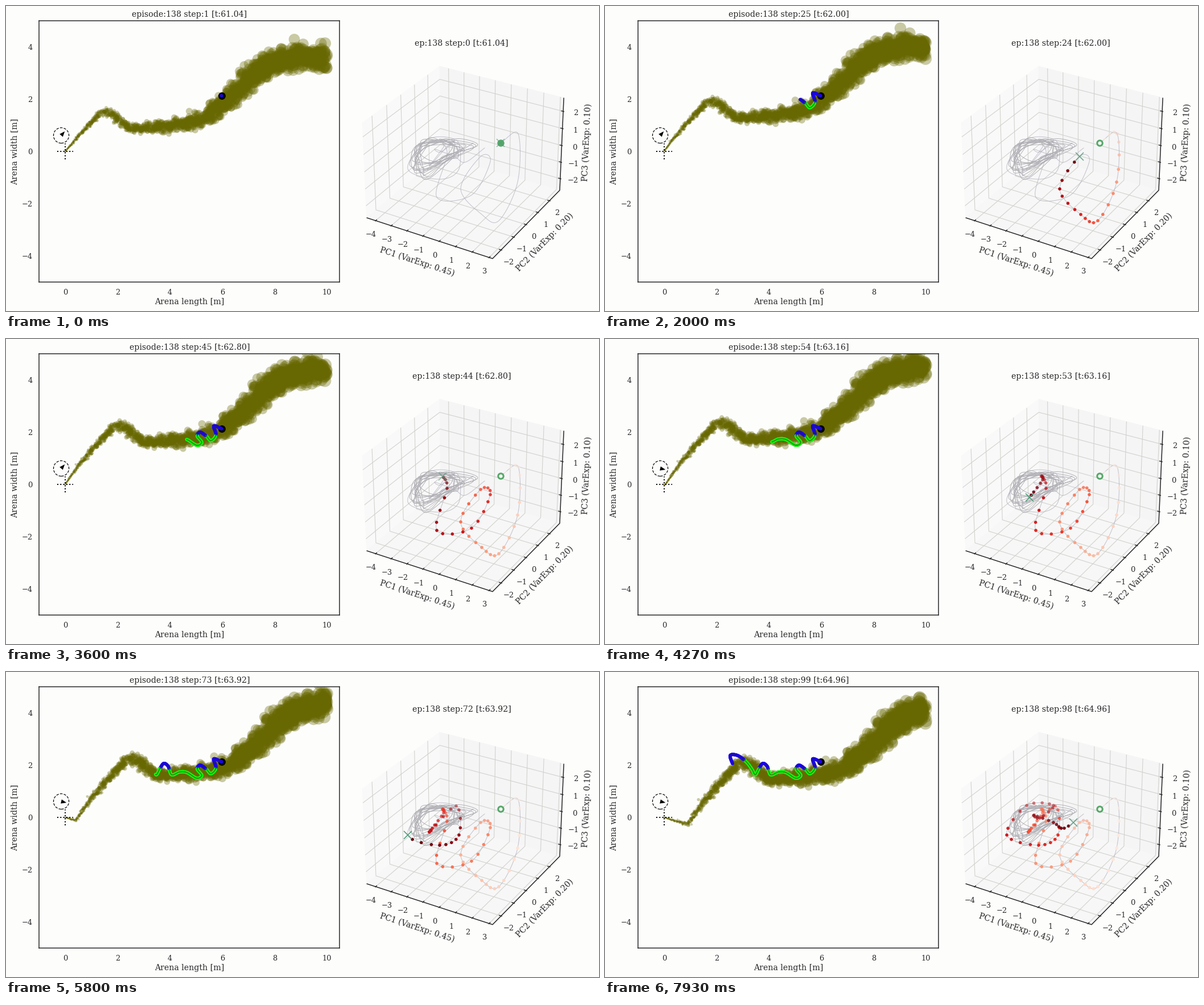
Recreate the animation shown at these times as a matplotlib script. Size 1042 px wide and 537 px high, loop 8000 ms.

```python
import numpy as np
import matplotlib.pyplot as plt
from matplotlib.animation import FuncAnimation
from matplotlib.collections import LineCollection
from matplotlib.patches import Circle, Polygon

W, H, DPI = 1042, 537, 64
PT = 72 / DPI                      # points per pixel
FRAMES, LOOP, STEPS = 120, 8000, 99
DT, TURN = 0.04, 51                # seconds per step, step of the wind change
BG, INK, GREEN = "#fdfdfc", "#262626", "#55a868"
LABEL, TICK = 14.15, 13.0
LEFT, TOP, WIDE, TALL = 58, 26, 528, 460

plt.rcParams["font.family"] = "DejaVu Serif"
rng = np.random.default_rng(138)

fig = plt.figure(figsize=(W / DPI, H / DPI), dpi=DPI, facecolor=BG)
stage = fig.add_axes([0, 0, 1, 1])
stage.set(xlim=(0, W), ylim=(H, 0))
stage.axis("off")
arena = fig.add_axes([LEFT / W, 1 - (TOP + TALL) / H, WIDE / W, TALL / H],
                     facecolor="none")
arena.set(xlim=(-1, 10.5), ylim=(-5, 5), xticks=[], yticks=[])
for spine in arena.spines.values():
    spine.set(color=INK, linewidth=1.5 * PT)


def text(x, y, s, size=LABEL, ha="center", va="baseline", rot=0):
    return stage.text(x, y, s, size=size * PT, ha=ha, va=va, rotation=rot,
                      rotation_mode="anchor", color=INK, zorder=9)


def num(v):
    return str(v).replace("-", "\u2212")


def to_data(pts):
    x, y = np.asarray(pts, float).T
    return np.column_stack([(x - LEFT) / WIDE * 11.5 - 1, 5 - (y - TOP) / TALL * 10])


def smooth(pts, n=8):
    """Catmull-Rom curve with n samples per span."""
    p = np.array(pts, float)
    q = np.vstack([2 * p[0] - p[1], p, 2 * p[-1] - p[-2]])
    t = np.linspace(0, 1, n, endpoint=False)[:, None]
    spans = [b + t / 2 * (c - a + t * (2 * a - 5 * b + 4 * c - d
                                       + t * (3 * b - a - 3 * c + d)))
             for a, b, c, d in zip(q, q[1:], q[2:], q[3:])]
    return np.vstack(spans + [p[-1:]])


def even(p, count):
    """Points at equal distances along a polyline, and its length."""
    s = np.r_[0, np.cumsum(np.hypot(*np.diff(p, axis=0).T))]
    at = np.linspace(0, s[-1], count)
    return np.column_stack([np.interp(at, s, c) for c in p.T]), s[-1]


# ---- arena labels
left_title = text(322.5, 19.5, "")
text(322.5, 525, "Arena length [m]")
text(15, 256.5, "Arena width [m]", va="center", rot=90)
for v in range(0, 11, 2):
    text(104 + 46 * v, 507.5, num(v), TICK)
for v in range(-4, 5, 2):
    text(46.5, 261 - 46 * v, num(v), TICK, ha="right")

# ---- plume: puffs carried by a uniform wind that turns once
WIND = np.array([[0.295, 0.42], [0.48, -0.145]])
RATE, SPEED = 60, 0.5


def drift(step):
    step = np.asarray(step, float)[..., None]
    return DT * (np.minimum(step, TURN) * WIND[0]
                 + np.maximum(step - TURN, 0) * WIND[1])


bends = [(0, 0), (.9, 1), (1.6, 1.52), (2.5, .92), (4, .98), (5.6, 1.45),
         (7.4, 3.05), (8.4, 3.55), (10.1, 3.55)]
old, length = even(smooth(bends), 1600)
fresh = np.arange(0, STEPS, 1 / (RATE * DT))
base = np.vstack([old, -drift(fresh)])
born = np.r_[-np.linspace(0, length / SPEED, len(old)) / DT, fresh]
spread = rng.normal(size=base.shape) / 46
puffs = arena.scatter([], [], color="#686802", alpha=0.35, linewidths=0, zorder=1)

# ---- source cross and wind compass
dots = dict(color="black", lw=2 * PT, ls=":", zorder=3)
arena.plot([-0.3, 0.3], [0, 0], **dots)
arena.plot([0, 0], [-0.3, 0.3], **dots)
HUB = np.array([-0.15, 0.61])
arena.add_patch(Circle(HUB, 0.295, fill=False, ec="black", lw=1.2 * PT,
                       ls=(0, (3.7, 1.9)), zorder=3))
needle = arena.add_patch(Polygon(np.zeros((3, 2)), fc="black", lw=0, zorder=3))


def needle_shape(deg):
    a = np.radians(deg)
    d, n = np.array([np.cos(a), np.sin(a)]), np.array([-np.sin(a), np.cos(a)])
    return HUB + np.array([9.5 * d, 3.7 * n, -3.7 * n]) / 46


# ---- agent track: constant speed through the turns of its zigzag
turns = [(379, 158), (365, 153), (369, 169), (360, 179), (352, 171), (341, 164),
         (336, 171), (344, 182), (335, 187), (318, 177), (305, 176), (291, 181),
         (285, 166), (277, 161), (270, 171), (264, 181), (258, 171), (248, 158),
         (233, 147), (220, 147), (225, 164)]
SUB = 4
walk, _ = even(smooth(turns), STEPS * SUB + 1)
px, py = walk[:-1].T
inside = (py > 170 - 0.6 * np.maximum(270 - px, 0)) & (px > 236)
walk = to_data(walk)
segments = np.stack([walk[:-1], walk[1:]], axis=1)
arena.plot(*walk[0], "o", color="black", ms=13 * PT, mew=0, zorder=4)


def ribbon(width, scent, clear, z):
    lines = LineCollection([], linewidths=width * PT, capstyle="round", zorder=z)
    arena.add_collection(lines, autolim=False)
    return lines, np.where(inside, scent, clear)


ribbons = [ribbon(5.8, "#12f60c", "#1c06e6", 5), ribbon(1.4, "#2f8a14", "#1a0cb0", 6)]

# ---- 3D box
LOW, HIGH = np.array([-4.588, -2.656, -2.717]), np.array([3.2, 2.917, 2.78])
SPAN = HIGH - LOW
HALF = np.array([4, 4, 3]) / 7
el, az = np.radians(30), np.radians(-60)
EYE = np.array([np.cos(el) * np.cos(az), np.cos(el) * np.sin(az), np.sin(el)])
RIGHT = np.array([-np.sin(az), np.cos(az), 0])
UP = np.cross(EYE, RIGHT)


def project(*pts):
    p = (2 * (np.array(pts, float) - LOW) / SPAN - 1) * HALF
    k = 222 / (1 - p @ EYE / 10)
    return np.column_stack([806.3 + p @ RIGHT * k, 267.5 - p @ UP * k])


def line3(pts, color, width, z):
    stage.plot(*project(*pts).T, color=color, lw=width * PT, zorder=z,
               solid_capstyle="butt")


(x0, y0, z0), (x1, y1, z1) = LOW, HIGH
panes = [([(x0, y0, z0), (x0, y1, z0), (x0, y1, z1), (x0, y0, z1)], "#f9f9f9"),
         ([(x0, y1, z0), (x1, y1, z0), (x1, y1, z1), (x0, y1, z1)], "#f5f5f6"),
         ([(x0, y0, z0), (x1, y0, z0), (x1, y1, z0), (x0, y1, z0)], "#f7f7f7")]
for corners, shade in panes:
    stage.add_patch(Polygon(project(*corners), fc=shade, ec=shade, lw=0.5, zorder=0))

sx, sy = SPAN[:2] / 60             # inward tick length
axes3 = [
    (range(-4, 4), lambda v: [(v, y0, z0), (v, y1, z0), (v, y1, z1)],
     lambda v: [(v, y0 + sy, z0), (v, y0 - sy / 2, z0)], (-8, 28.5)),
    (range(-2, 3), lambda v: [(x1, v, z0), (x0, v, z0), (x0, v, z1)],
     lambda v: [(x1 - sx, v, z0), (x1 + sx / 2, v, z0)], (13.5, 25.5)),
    (range(-2, 3), lambda v: [(x0, y0, v), (x0, y1, v), (x1, y1, v)],
     lambda v: [(x1 - sx, y1, v), (x1 + sx / 2, y1, v)], (22.5, 7)),
]
for values, grid, mark, (dx, dy) in axes3:
    for v in values:
        line3(grid(v), "#d1d1cc", 1.1, 1)
        line3(mark(v), INK, 1.4, 2)
        a, b = project(*mark(v))
        x, y = a + (b - a) * 2 / 3
        text(x + dx, y + dy, num(v), TICK)
line3([(x0, y0, z0), (x1, y0, z0), (x1, y1, z0), (x1, y1, z1)], INK, 1.5, 2)

right_title = text(800.5, 70, "")
text(722, 450, "PC1 (VarExp: 0.45)", va="center", rot=-18)
text(947, 416, "PC2 (VarExp: 0.20)", va="center", rot=45.7)
text(1021, 240, "PC3 (VarExp: 0.10)", va="center", rot=87.5)

# ---- neural state: one key pose every four steps
poses = [(869, 241), (900, 225), (899, 310), (866, 378), (836, 367), (799, 322),
         (834, 265), (851, 274), (818, 333), (757, 337), (775, 263), (767, 242),
         (769, 248), (749, 275), (747, 279), (791, 236), (796, 287), (762, 305),
         (706, 287), (741, 235), (788, 235), (764, 257), (754, 252), (788, 265),
         (807, 275), (841, 250)]
state = smooth(poses, 4)[:STEPS + 1]
stage.plot(*smooth(poses, 12).T, color="#b4b4c0", lw=PT, alpha=0.8, zorder=3)

# later laps: loose random orbits, reaching to the right and to the lower left
LAPS, KNOTS = 13, 7
phi = np.arange(LAPS * KNOTS) * 2 * np.pi / KNOTS + rng.normal(0, 0.25, LAPS * KNOTS)
size = rng.uniform(0.45, 1.05, phi.size)
reach = rng.uniform(0, 1, phi.size)
tx = 757 + 50 * size * np.cos(phi) + 26 * reach * np.cos(phi / 2) ** 40
ty = 255 + 25 * size * np.sin(phi) + 34 * reach * np.maximum(np.cos(phi - 2.2), 0) ** 6
tangle = smooth(np.column_stack([tx, ty - 0.12 * (tx - 757)]), 10)
stage.plot(*tangle.T, color="#a8a8ae", lw=PT, alpha=0.85, zorder=3)

reds = plt.get_cmap("Reds")
beads = stage.scatter([], [], s=(5.6 * PT) ** 2, linewidths=0, zorder=5)
depth = np.clip(0.55 + (state[:, 1] - 235) / 100, 0.55, 1)
ring, = stage.plot(*state[0], "o", ms=9.4 * PT, mfc="#f3f6f2", mec=GREEN,
                   mew=3 * PT, zorder=6)
cross, = stage.plot([], [], "x", ms=14 * PT, mec="#4f9a78", mew=1.6 * PT, zorder=7)


def update(frame):
    i = max(0, -(-frame * 5 // 6) - 1)
    clock = f"[t:{61.04 + DT * i:.2f}]"
    left_title.set_text(f"episode:138 step:{i + 1} {clock}")
    right_title.set_text(f"ep:138 step:{i} {clock}")

    age = np.clip(DT * (i - born), 0, 25)
    pos = base + drift(i) + spread * age[:, None] ** 0.75
    live = (born <= i) & (pos[:, 0] < 10.02)
    puffs.set_offsets(pos[live])
    puffs.set_sizes((2 * PT * (1.2 + 0.4 * age[live])) ** 2)
    needle.set_xy(needle_shape(49 if i < TURN else -13))

    n = max(i * SUB, 1)
    for lines, colors in ribbons:
        lines.set_segments(segments[:n])
        lines.set_color(colors[:n])

    shades = reds(np.arange(i) / max(i - 1, 1))
    shades[:, 3] = depth[:i]
    beads.set_offsets(state[:i])
    beads.set_facecolors(shades)
    ring.set_markerfacecolor(GREEN if i == 0 else "#f3f6f2")
    cross.set_data(state[i:i + 1, 0], state[i:i + 1, 1])
    cross.set_alpha(depth[i])
    return []


anim = FuncAnimation(fig, update, frames=FRAMES, init_func=lambda: update(0),
                     interval=LOOP / FRAMES, repeat=True, repeat_delay=0)
plt.show()
```
